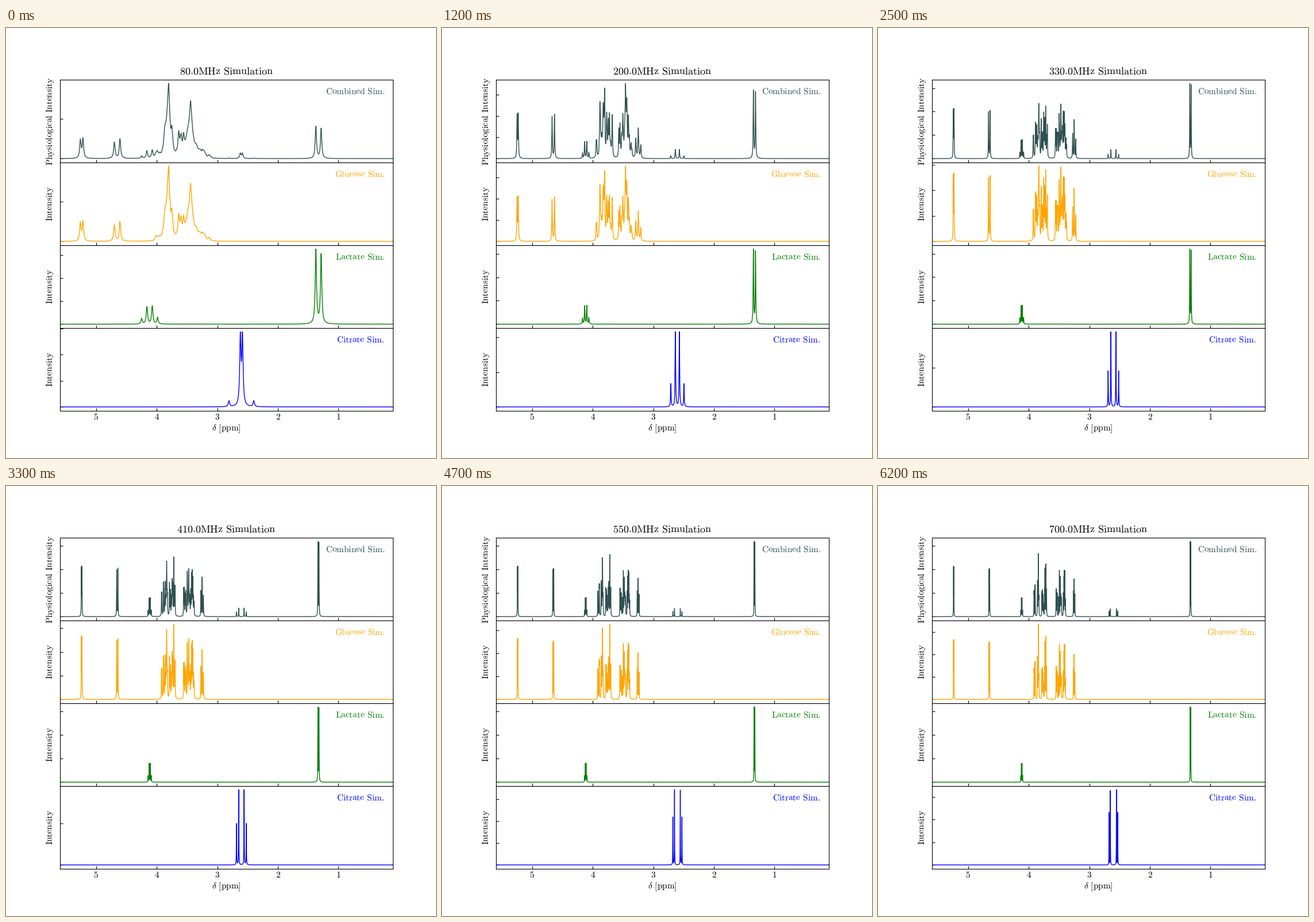
Write a matplotlib script that moves like this. It is 748 by 748 pixels and loops after 6300 ms.

```python
import numpy as np
import matplotlib.pyplot as plt
from matplotlib.animation import FuncAnimation
from matplotlib.ticker import MaxNLocator

SIZE, DPI = 748, 100
FRAMES, INTERVAL = 63, 100
HALF_WIDTH = 1.0            # Lorentzian half width in Hz
SPAN, POINTS = 8.0, 2 ** 15  # ppm grid

plt.rcParams.update({
    "font.size": 11,
    "mathtext.fontset": "cm",
    "text.hinting": "none",
    "xtick.direction": "in",
    "ytick.direction": "in",
})

STEP = SPAN / POINTS
ppm = np.arange(POINTS) * STEP
distance = np.minimum(ppm, SPAN - ppm)
visible = (ppm >= 0.1) & (ppm <= 5.6)


class SpinSystem:
    """Strongly coupled protons, solved exactly at any field."""

    def __init__(self, shifts, couplings):
        n = len(shifts)
        self.n = n
        raising = np.array([[0, 1], [0, 0]])
        iz = [self.embed(np.diag([0.5, -0.5]), k) for k in range(n)]
        ip = [self.embed(raising, k) for k in range(n)]
        self.total = sum(ip)
        self.zeeman = sum(s * z for s, z in zip(shifts, iz))
        self.coupling = np.zeros_like(self.zeeman)
        for (a, b), j in couplings.items():
            flip = ip[a] @ ip[b].T
            self.coupling += j * (iz[a] @ iz[b] + 0.5 * (flip + flip.T))

    def embed(self, op, k):
        return np.kron(np.kron(np.eye(2 ** k), op), np.eye(2 ** (self.n - k - 1)))

    def lines(self, mhz):
        energy, states = np.linalg.eigh(mhz * self.zeeman + self.coupling)
        weight = (states.T @ self.total @ states) ** 2
        weight *= self.n / weight.sum()
        shift = (energy[:, None] - energy[None, :]) / mhz
        keep = (weight > 1e-7) & (shift > 0) & (shift < SPAN - 0.01)
        return shift[keep], weight[keep]

    def spectrum(self, mhz):
        shift, weight = self.lines(mhz)
        place = shift / STEP
        cell = place.astype(int)
        part = place - cell
        sticks = (np.bincount(cell, weight * (1 - part), POINTS)
                  + np.bincount(cell + 1, weight * part, POINTS))
        shape = 1 / (1 + (distance * mhz / HALF_WIDTH) ** 2)
        return np.fft.irfft(np.fft.rfft(sticks) * np.fft.rfft(shape), POINTS)


def sugar(shifts, js):
    pairs = [(0, 1), (1, 2), (2, 3), (3, 4), (4, 5), (4, 6), (5, 6)]
    return SpinSystem(shifts, dict(zip(pairs, js)))


alpha = sugar([5.238, 3.539, 3.718, 3.415, 3.842, 3.846, 3.769],
              [3.8, 9.6, 9.4, 9.9, 2.0, 6.0, -12.1])
beta = sugar([4.650, 3.250, 3.493, 3.407, 3.470, 3.902, 3.727],
             [8.0, 9.1, 9.4, 8.9, 2.0, 5.4, -12.3])
lactate = SpinSystem([4.115, 1.33, 1.33, 1.33], {(0, k): 7.0 for k in (1, 2, 3)})
citrate = SpinSystem([2.662, 2.542], {(0, 1): 15.0})


def tex(text):
    return r"$\mathrm{" + text.replace(" ", r"}\hspace{0.38}\mathrm{") + "}$"


fig, axes = plt.subplots(4, 1, sharex=True, figsize=(SIZE / DPI, SIZE / DPI),
                         dpi=DPI, facecolor="white", gridspec_kw={"hspace": 0})
fig.subplots_adjust(left=0.125, right=0.9, bottom=0.11, top=0.88)


def label(x, y, text, **style):
    return fig.text(x / SIZE, 1 - y / SIZE, text, va="baseline", **style)


PANELS = [
    ("Combined Sim.", "darkslategray", 556, "Physiological Intensity"),
    ("Glucose Sim.", "orange", 572, "Intensity"),
    ("Lactate Sim.", "green", 573, "Intensity"),
    ("Citrate Sim.", "blue", 575.4, "Intensity"),
]
curves = []
for row, (ax, (name, color, left, side)) in enumerate(zip(axes, PANELS)):
    curves += ax.plot(ppm[visible], np.zeros(visible.sum()), color=color, lw=1)
    ax.yaxis.set_major_locator(MaxNLocator(4, steps=[1, 2, 2.5, 5, 10]))
    ax.tick_params(axis="y", labelleft=False)
    label(left, 115.2 + 144 * row, tex(name), color=color)
    label(80.7, 161.8 + 144 * row, tex(side), ha="center",
          rotation=90, rotation_mode="anchor")

axes[-1].set_xticks(range(1, 6), [tex(str(n)) for n in range(1, 6)])
axes[-1].tick_params(axis="x", pad=2.9)
axes[-1].set_xlim(5.6, 0.1)
label(383.4, 701.2, r"$\delta\hspace{0.38}\mathrm{[ppm]}$", ha="center")
title = label(383.4, 82, "", ha="center", fontsize=13)


def update(frame):
    mhz = 80.0 + 10 * frame
    glu = alpha.spectrum(mhz) + beta.spectrum(mhz)
    lac = 0.52 * lactate.spectrum(mhz)
    cit = 0.5625 * citrate.spectrum(mhz)
    for ax, curve, data in zip(axes, curves, (glu + lac + cit / 4, glu, lac, cit)):
        y = data[visible]
        curve.set_ydata(y)
        margin = 0.05 * np.ptp(y)
        ax.set_ylim(y.min() - margin, y.max() + margin)
    title.set_text(tex(f"{mhz:.1f}MHz Simulation"))
    return [*curves, title]


anim = FuncAnimation(fig, update, frames=FRAMES, interval=INTERVAL,
                     repeat=True, repeat_delay=0, blit=False)
plt.show()
```
